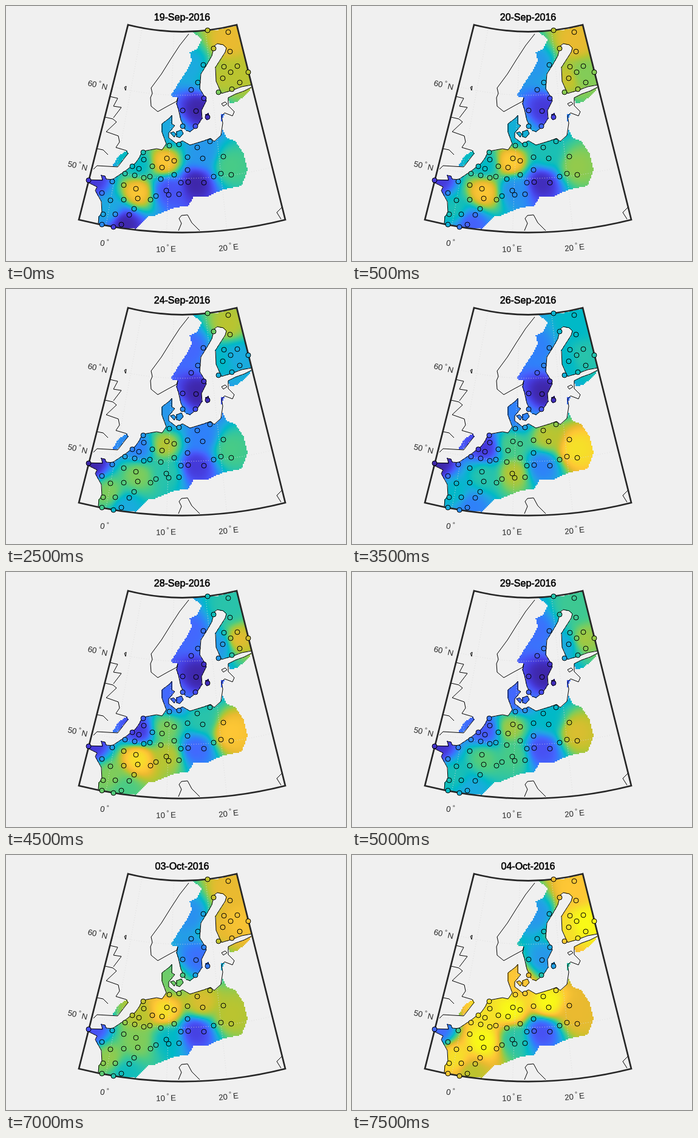
Animation of 560x420 px, one loop 8000 ms. Source, as an HTML page with a canvas:

```html
<!DOCTYPE html>
<html lang="en">
<head>
<meta charset="utf-8">
<title>Daily station map</title>
<style>
  html, body { margin: 0; width: 100%; height: 100%; overflow: hidden; background: #f0f0f0; }
  canvas, svg { position: absolute; left: 0; top: 0; width: 560px; height: 420px; }
  canvas { image-rendering: pixelated; }
  text { font-family: "Liberation Sans", Arial, sans-serif; font-size: 13.3px; fill: #262626; text-anchor: middle; }
  .deg { font-size: 10.5px; }
  #title { font-size: 16px; fill: #000; stroke: #000; stroke-width: .6px; }
  #grid { fill: none; stroke: #dcdcdc; stroke-dasharray: 1 3; }
  #coasts { fill: none; stroke: #000; stroke-linejoin: round; }
  #frame { fill: none; stroke: #262626; stroke-width: 2.7; }
  #stations { stroke: #000; }
</style>
</head>
<body>
<canvas id="field" width="280" height="210"></canvas>
<svg viewBox="0 0 560 420">
  <g id="grid"></g>
  <g id="coasts"></g>
  <path id="frame" d="M201 31A364 364 0 0 0 380 31L460 352A695 695 0 0 1 120 352Z"/>
  <g id="stations"></g>
  <text id="title" x="290" y="24"></text>
  <g id="labels"></g>
</svg>
<script>
const $ = id => document.getElementById(id);
const add = (parent, tag, attrs) => {
  const el = document.createElementNS('http://www.w3.org/2000/svg', tag);
  for (const k in attrs) el.setAttribute(k, attrs[k]);
  return parent.appendChild(el);
};

// Fan-shaped projection: centre above the stage, angles in degrees from vertical
const polar = (r, deg) => {
  const t = deg * Math.PI / 180;
  return `${290 + r * Math.sin(t)} ${-322 + r * Math.cos(t)}`;
};
for (const r of [469, 606])
  add($('grid'), 'path', { d: `M${polar(r, -14.1)}A${r} ${r} 0 0 0 ${polar(r, 14.1)}` });
for (const deg of [-10.4, -2.1, 6.1])
  add($('grid'), 'path', { d: `M${polar(364, deg)}L${polar(695, deg)}` });

function label(x, y, turn, num, side) {
  const g = add($('labels'), 'g', { transform: `translate(${x} ${y}) rotate(${turn})` });
  add(g, 'text', { x: side ? -8 : -3, y: 5 }).textContent = num;
  add(g, 'text', { x: side ? 4 : 5, y: 0, class: 'deg' }).textContent = '°';
  if (side) add(g, 'text', { x: 13, y: 5 }).textContent = side;
}
label(150, 129.5, 13, '60', 'N');
label(117, 262.5, 13, '50', 'N');
label(162, 390.5, 10, '0', '');
label(262.5, 400, -2, '10', 'E');
label(365.5, 397.5, -6, '20', 'E');

// Shores shared by the coast lines and the coloured area
const shore = {
  eastSweden: '343 66 339 82 331 96 321 112 319 136 327 149 330 156 322 172 323 185 314 199 303 207 297 205',
  westSweden: '295 203 288 188 284 170 281 161 283 151',
  finland: '404 130 388 133 372 139 355 144 346 124 345 101 361 76 363 69 358 64 348 62 343 66',
  main: '152 358 153 347 158 341 157 322 147 304 150 298 136 291 134 286 159 287 157 279 163 280 165 285 175 286 196 272 213 259 220 249 224 240 232 238 248 235 257 237 264 227 257 208 257 194 270 184 273 180 273 194 278 197 268 209 268 217 281 227 291 222 303 229 326 222 337 218 343 223 354 213',
  estonia: '404 134 392 140 378 145 366 151',
  gotland: '329 179 333 177 335 182 331 187Z',
  funen: '271 209 276 207 280 211 277 216Z',
  zealand: '281 207 289 204 292 210 286 217 281 215Z'
};
const coasts = [
  ...Object.values(shore),
  '301 46 286 65 271 88 256 112 239 135 241 144 238 151 239 165 250 174 266 165 281 157 283 151',
  '354 213 357 193 355 181 360 176 373 181 376 174 366 164 366 151',
  '175 137 171 149 184 152 177 165 190 167 177 184',
  '163 183 176 186 182 191 165 207 185 214 187 224 181 233 198 238 201 243 184 265 150 263 144 269',
  '150 235 160 237 168 245', '195 134 198 132 197 139Z', '355 161 361 158 364 161 358 165Z',
  '284 370 289 358 285 350 289 345 299 344 306 357 319 370',
  '456 330 446 340 453 351'
];
for (const c of coasts) add($('coasts'), 'path', { d: 'M' + c });

const covered = new Path2D();
[
  `306 42 345 40 380 32 405 131 ${shore.finland} ${shore.eastSweden} ${shore.westSweden}
    271 148 288 121 299 104 306 89 303 77 315 70 323 55Z`,
  `${shore.main} 357 205 363 217 377 222 391 243 398 270 388 296 358 302 331 314 310 313 300 329
    278 332 246 345 236 345 213 367 185 365 150 358Z`,
  `${shore.estonia} 368 161 381 158 394 147 402 139Z`,
  '355 190 354 178 360 177Z',
  '175 264 186 246 200 238 201 243 184 264Z',
  shore.gotland, shore.funen, shore.zealand
].forEach(p => covered.addPath(new Path2D('M' + p)));

// The field blends a few regional levels (palette scale 0..15) set on key days
const keyDays = [0, 3, 5, 7, 9, 12, 15];
const regions = [];
const region = (x, y, ...levels) => regions.push({ x, y, levels });
region(366, 60, 12, 12, 11, 7, 8, 10, 13);
region(380, 112, 11, 8, 6, 8, 12, 8, 15);
region(354, 120, 11, 12, 7, 7, 5, 8, 14);
region(305, 100, 6, 3, 3, 4, 3, 4, 5);
region(318, 170, 0, 3, 0, 0, 0, 0, 5);
region(272, 208, 6, 7, 5, 4, 3, 3, 13);
region(219, 262, 7, 7, 4, 1, 1, 5, 14);
region(262, 257, 13, 14, 11, 9, 10, 12, 15);
region(322, 244, 5, 13, 4, 11, 8, 5, 15);
region(368, 264, 9, 13, 9, 14, 13, 9, 12);
region(312, 291, 0, 1, 1, 4, 3, 0, 2);
region(267, 302, 2, 10, 8, 11, 11, 5, 8);
region(217, 306, 13, 13, 10, 8, 14, 0, 15);
region(140, 287, 1, 1, 0, 0, 1, 0, 3);
region(170, 335, 6, 11, 10, 7, 10, 3, 14);
region(195, 358, 0, 8, 6, 4, 9, 0, 11);

// Inverse-distance blend, one value per key day
function levelsAt(x, y) {
  const weights = regions.map(r => ((x - r.x) ** 2 + (y - r.y) ** 2 + 150) ** -2);
  const total = weights.reduce((a, b) => a + b);
  return keyDays.map((_, k) =>
    regions.reduce((sum, r, i) => sum + weights[i] * r.levels[k], 0) / total);
}

const palette = '3E26A8 4538D7 484FF2 4367FD 2F80FA 2797EB 1CAADF 00B9C7 29C3AA 48CB86 81CC59 BBC42F EABA30 FEC735 F5E128 F9FB15'
  .split(' ').map(h => [0, 2, 4].map(i => parseInt(h.slice(i, i + 2), 16)));
function colour(v) {
  const i = Math.min(14, Math.floor(v));
  return palette[i].map((a, c) => Math.round(a + (palette[i + 1][c] - a) * (v - i)));
}

const ctx = $('field').getContext('2d');
const image = ctx.createImageData(280, 210);
const cells = [];
for (let y = 0; y < 210; y++)
  for (let x = 0; x < 280; x++)
    if (ctx.isPointInPath(covered, 2 * x + 1, 2 * y + 1))
      cells.push({ at: 4 * (y * 280 + x), levels: levelsAt(2 * x + 1, 2 * y + 1) });

const places = `332 40,366 43,342 70,369 75,325 97,359 100,381 99,399 109,357 119,385 126,350 142,
  370 109,372 137,316 126,305 138,326 152,291 172,313 173,332 183,291 198,312 198,269 230,285 228,
  315 233,336 223,226 241,227 253,265 251,277 255,299 249,324 251,358 248,208 264,219 268,241 264,
  257 266,299 270,196 276,212 279,227 283,237 281,255 285,277 278,288 291,300 290,326 291,342 281,
  354 276,371 278,136 287,175 289,194 295,158 308,172 320,194 319,214 301,217 317,238 319,247 313,
  264 304,268 311,285 310,211 334,203 344,180 343,160 343,158 360,177 364,190 360`;
const stations = places.split(',').map(p => {
  const [x, y] = p.trim().split(' ').map(Number);
  return { levels: levelsAt(x, y), dot: add($('stations'), 'circle', { cx: x, cy: y, r: 4 }) };
});

function draw(day) {
  const b = Math.max(1, keyDays.findIndex(k => k >= day)), a = b - 1;
  const f = (day - keyDays[a]) / (keyDays[b] - keyDays[a]);
  const mix = v => colour(v[a] + (v[b] - v[a]) * f);
  for (const c of cells) image.data.set([...mix(c.levels), 255], c.at);
  ctx.putImageData(image, 0, 0);
  for (const s of stations) s.dot.setAttribute('fill', `rgb(${mix(s.levels)})`);
  const date = day < 12 ? `${19 + day}-Sep` : `0${day - 11}-Oct`;
  $('title').textContent = date + '-2016';
}

// One day every half second, sixteen days in a loop
let shown = -1;
function tick() {
  const day = Math.floor(performance.now() % 8000 / 500);
  if (day !== shown) draw(shown = day);
  requestAnimationFrame(tick);
}
tick();
</script>
</body>
</html>
```
